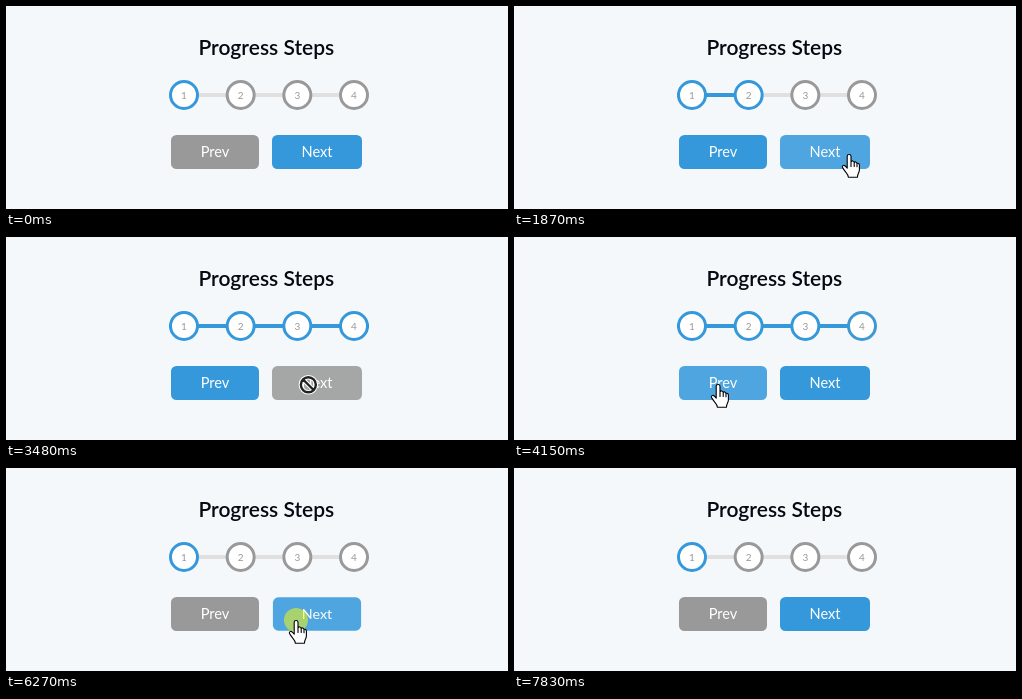
Write an HTML page that moves like this. It is 502x203 px and loops after 8.63 s.

```html
<!DOCTYPE html>
<html lang="en">
<head>
<meta charset="utf-8">
<title>Progress Steps</title>
<style>
  html, body { margin: 0; width: 100%; height: 100%; overflow: hidden; background: #f4f8fb; }
  svg { display: block; width: 502px; height: 203px; font-family: Lato, "Open Sans", sans-serif; }
  text { text-anchor: middle; }
  .title { font-size: 21px; font-weight: 600; fill: #050a12; }
  .circle { fill: #fff; stroke-width: 3; }
  .digit { font-size: 10px; fill: #999; }
  .label { font-size: 14.6px; fill: #fff; }
  .cursor path, .cursor circle { stroke-linejoin: round; stroke-linecap: round; }
</style>
</head>
<body>
<svg viewBox="0 0 502 203">
  <rect width="502" height="203" fill="#f4f8fb"/>
  <text class="title" x="260.3" y="49">Progress Steps</text>
  <rect x="163" y="87" width="200" height="4" fill="#e0e0e0"/>
  <rect id="bar" x="163" y="87" height="4" fill="#3498db"/>
  <g id="circles"></g>
  <g id="buttons"></g>
  <circle id="halo" r="12" fill="#ff0" fill-opacity=".5"/>
  <g id="cursor" class="cursor">
    <path id="arrow" d="M0 0V16L3.7 12.6L6.2 18.3L8.7 17.2L6.2 11.6H11.2Z" fill="#fff" stroke="#000"/>
    <path id="hand" fill="#fff" stroke="#000" stroke-width="1.1"
      d="M-1.8 2.2C-1.8 0 2 0 2 2.2V8C2.4 6.4 5 6.6 5.2 8.6C5.8 7.4 7.8 7.8 8 9.6C8.8 8.8 10.4 9.4 10.4 11V16C10.4 18.6 8.4 19.6 8.4 23.2H-.6C-.6 20.4-3.2 18.6-4.6 16.4L-6.4 13.6C-7.4 11.8-5 10.6-3.6 12.2L-1.8 14.2Z
         M2 8V12.5M5.2 8.6V12.5M8 9.6V12.8"/>
    <g id="blocked" fill="none">
      <path d="M-5 -5L5 5M7.5 0A7.5 7.5 0 1 1 -7.5 0A7.5 7.5 0 1 1 7.5 0" stroke="#fff" stroke-width="4.5"/>
      <path d="M-5 -5L5 5M7.5 0A7.5 7.5 0 1 1 -7.5 0A7.5 7.5 0 1 1 7.5 0" stroke="#222" stroke-width="2.4"/>
    </g>
  </g>
</svg>
<script>
const LOOP = 8630;
const BLUE = [52, 152, 219], GREY = [153, 153, 153];
const $ = id => document.getElementById(id);

// [press, release, step after the click]
const clicks = [
  [1340, 1600, 2], [2210, 2410, 3], [2940, 3140, 4], [3890, 4150, 3],
  [4640, 4840, 2], [5390, 5590, 1], [6270, 6470, 2], [7140, 7340, 1]
];

// [start, end, from, to, easing]
const easeOut = p => 1 - (1 - p) ** 2;
const easeIn = p => p ** 1.5;
const smooth = p => p * p * (3 - 2 * p);
const moves = [
  [560, 1070, [389, 168], [335, 148], easeOut],
  [3380, 3690, [335, 148], [204, 147], smooth],
  [5870, 6070, [204, 147], [290, 152], smooth],
  [6680, 6940, [290, 152], [204, 147], smooth],
  [7440, 7830, [204, 147], [430, 200], easeIn]
];

function add(parent, tag, attrs, text = "") {
  const node = document.createElementNS("http://www.w3.org/2000/svg", tag);
  for (const key in attrs) node.setAttribute(key, attrs[key]);
  node.textContent = text;
  return parent.appendChild(node);
}

const circles = [1, 2, 3, 4].map(n => {
  const x = 178 + (n - 1) * 170 / 3;
  const ring = add($("circles"), "circle", { class: "circle", cx: x, cy: 89, r: 13.5 });
  add($("circles"), "text", { class: "digit", x, y: 92.5 }, n);
  return ring;
});

function makeButton(label, x, width, offStep) {
  const group = add($("buttons"), "g", {});
  const face = add(group, "rect", { x, y: 129, width, height: 34, rx: 5.5 });
  add(group, "text", { class: "label", x: x + width / 2, y: 151 }, label);
  return { group, face, x, width, offStep };
}
const buttons = [makeButton("Prev", 165, 88, 1), makeButton("Next", 266, 90, 4)];

const clamp = v => Math.max(0, Math.min(1, v));
const mix = (a, b, p) => a + (b - a) * p;
const color = p => `rgb(${GREY.map((g, i) => Math.round(mix(g, BLUE[i], p)))})`;
const show = (node, on) => node.setAttribute("visibility", on ? "visible" : "hidden");

// CSS "ease": cubic-bezier(.25, .1, .25, 1)
function ease(x) {
  const bezier = (a, b, u) => 3 * a * u * (1 - u) ** 2 + 3 * b * u * u * (1 - u) + u ** 3;
  let lo = 0, hi = 1;
  for (let i = 0; i < 16; i++) {
    const mid = (lo + hi) / 2;
    if (bezier(.25, .25, mid) < x) lo = mid; else hi = mid;
  }
  return bezier(.1, 1, lo);
}

function pointerAt(t) {
  const move = moves.findLast(m => t >= m[0]) || moves[0];
  const [start, end, from, to, easing] = move;
  const p = easing(clamp((t - start) / (end - start)));
  return from.map((v, i) => mix(v, to[i], p));
}

function render(t) {
  let step = 1, previous = 1, changed = -1000;
  for (const [, release, next] of clicks) {
    if (t >= release) [previous, step, changed] = [step, next, release];
  }
  const p = ease(clamp((t - changed + 40) / 350));
  $("bar").setAttribute("width", mix(previous - 1, step - 1, p) * 200 / 3);
  circles.forEach((ring, i) => {
    ring.setAttribute("stroke", color(mix(+(i < previous), +(i < step), p)));
  });

  const [x, y] = pointerAt(t);
  const visible = t >= 590 && t < 7830;
  const pressed = clicks.some(([down, up]) => t >= down && t < up);
  let target = null;
  for (const button of buttons) {
    const over = visible && x >= button.x && x < button.x + button.width && y >= 129 && y < 163;
    if (over) target = button;
    const scale = over && pressed ? .98 : 1;
    const cx = button.x + button.width / 2;
    button.group.setAttribute("transform", `translate(${cx} 146) scale(${scale}) translate(${-cx} -146)`);
    button.group.setAttribute("opacity", over ? .86 : 1);
    button.face.setAttribute("fill", color(step === button.offStep ? 0 : 1));
  }

  const place = `translate(${x} ${y})`;
  $("cursor").setAttribute("transform", place);
  $("halo").setAttribute("transform", place);
  const disabled = target && step === target.offStep;
  show($("halo"), pressed);
  show($("arrow"), visible && !target);
  show($("hand"), visible && target && !disabled);
  show($("blocked"), visible && disabled);
}

const begin = performance.now();
function tick() {
  render((performance.now() - begin) % LOOP);
  requestAnimationFrame(tick);
}
tick();
</script>
</body>
</html>
```
